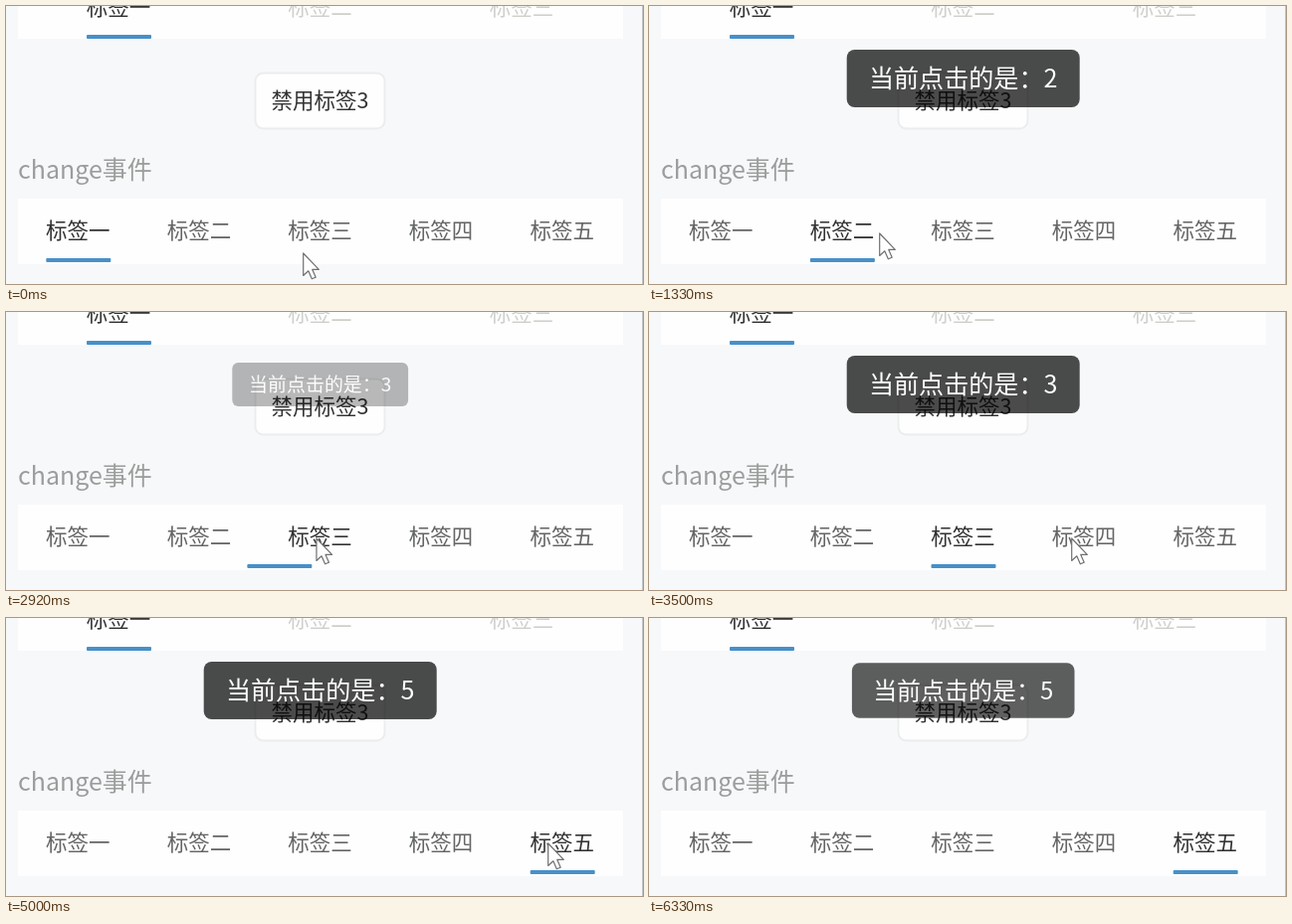
Write an HTML page that moves like this. It is 640 px wide and 280 px high and loops after 6.41 s.

```html
<!DOCTYPE html>
<html lang="zh-CN">
<head>
<meta charset="utf-8">
<style>
html, body { margin: 0; width: 100%; height: 100%; overflow: hidden; background: #f7f8fa; }
svg { display: block; width: 640px; height: 280px; font: 21.5px "Noto Sans CJK SC", "Noto Sans CJK", sans-serif; }
text { text-anchor: middle; fill: #646566; }
.panel { fill: #fefefe; }
.line { fill: #4690c8; }
.on { fill: #323233; font-weight: 500; }
.off { fill: #cfd0cc; }
</style>
</head>
<body>
<svg viewBox="0 0 640 280">
  <rect class="panel" x="12" y="-33" width="608" height="66"/>
  <text class="on" x="113" y="8.5">标签一</text>
  <text class="off" x="315.5" y="8.5">标签二</text>
  <text class="off" x="518" y="8.5">标签三</text>
  <rect class="line" x="81" y="29" width="65" height="4" rx="1"/>

  <rect x="250.5" y="67.5" width="130" height="56" rx="8" fill="#fefefe" stroke="#ebedee" stroke-width="2"/>
  <text x="315.5" y="103" style="fill:#323233">禁用标签3</text>

  <text x="12" y="174" style="text-anchor:start;fill:#9b9d9c;font-size:25px">change事件</text>
  <rect class="panel" x="12" y="194" width="608" height="66"/>
  <g id="tabs"></g>
  <rect id="line" class="line" y="254" width="65" height="4" rx="1"/>
  <rect x="639" width="1" height="280" fill="#c4c4c8"/>

  <g id="toast">
    <rect x="-117" y="-29" width="234" height="58" rx="8" fill="#000" fill-opacity=".7"/>
    <text id="msg" y="9" style="fill:#fefefe;font-size:25.1px"></text>
  </g>
  <path id="cursor" d="M.7 1V23.5L5.8 18.8 9.3 26.8 13.2 25.2 9.8 17.4H16.3Z" fill="#fefefe" stroke="#707070" stroke-width="1.2" stroke-linejoin="round"/>
</svg>
<script>
const LOOP = 6410, FPS = 12;
const MOVE = 600, SLIDE = 300, FADE = 300, HOLD = 1605;
const $ = id => document.getElementById(id);
const center = tab => 72.3 + 121.6 * tab;

// The pointer sets off at "go", rests at x, y and clicks the next tab there.
const stops = [
  { go: 200, click: 830, x: 231, y: 228 },
  { go: 1400, click: 2800, x: 311, y: 227 },
  { go: 2900, click: 3650, x: 424, y: 227 },
  { go: 3920, click: 4695, x: 544, y: 226 },
  { go: 5400, click: Infinity, x: 558, y: 290 }
];

const tabs = [...'一二三四五'].map((n, i) => {
  const tab = document.createElementNS('http://www.w3.org/2000/svg', 'text');
  tab.textContent = '标签' + n;
  tab.setAttribute('x', center(i));
  tab.setAttribute('y', 234);
  return $('tabs').appendChild(tab);
});

const clamp = v => Math.max(0, Math.min(1, v));
const smooth = v => v * v * (3 - 2 * v);
const easeOut = v => 1 - (1 - v) ** 2.2;
const mix = (a, b, k) => a + (b - a) * k;

function draw(t) {
  let x = 298, y = 248, active = 0, lineX = center(0);
  let shown = Infinity, last = -Infinity; // toast opened, last click
  for (const stop of stops) {
    const k = smooth(clamp((t - stop.go) / MOVE));
    x = mix(x, stop.x, k);
    y = mix(y, stop.y, k);
    if (t < stop.click) continue;
    active++;
    lineX = mix(center(active - 1), center(active), easeOut(clamp((t - stop.click) / SLIDE)));
    if (stop.click > last + HOLD + FADE) shown = stop.click;
    last = stop.click;
  }
  $('cursor').setAttribute('transform', `translate(${x} ${y})`);
  $('line').setAttribute('x', lineX - 32);
  tabs.forEach((tab, i) => tab.setAttribute('class', i === active ? 'on' : ''));

  const seen = Math.min(clamp((t - shown) / FADE), clamp(1 - (t - last - HOLD) / FADE));
  $('toast').setAttribute('opacity', seen);
  $('toast').setAttribute('transform', `translate(315.7 73) scale(${0.6 + 0.4 * seen})`);
  $('msg').textContent = '当前点击的是：' + (active + 1);
}

function frame() {
  const t = performance.now() % LOOP;
  draw(Math.floor((t + 4) * FPS / 1000) * 1000 / FPS); // stepped at 12 fps
  requestAnimationFrame(frame);
}
frame();
</script>
</body>
</html>
```
